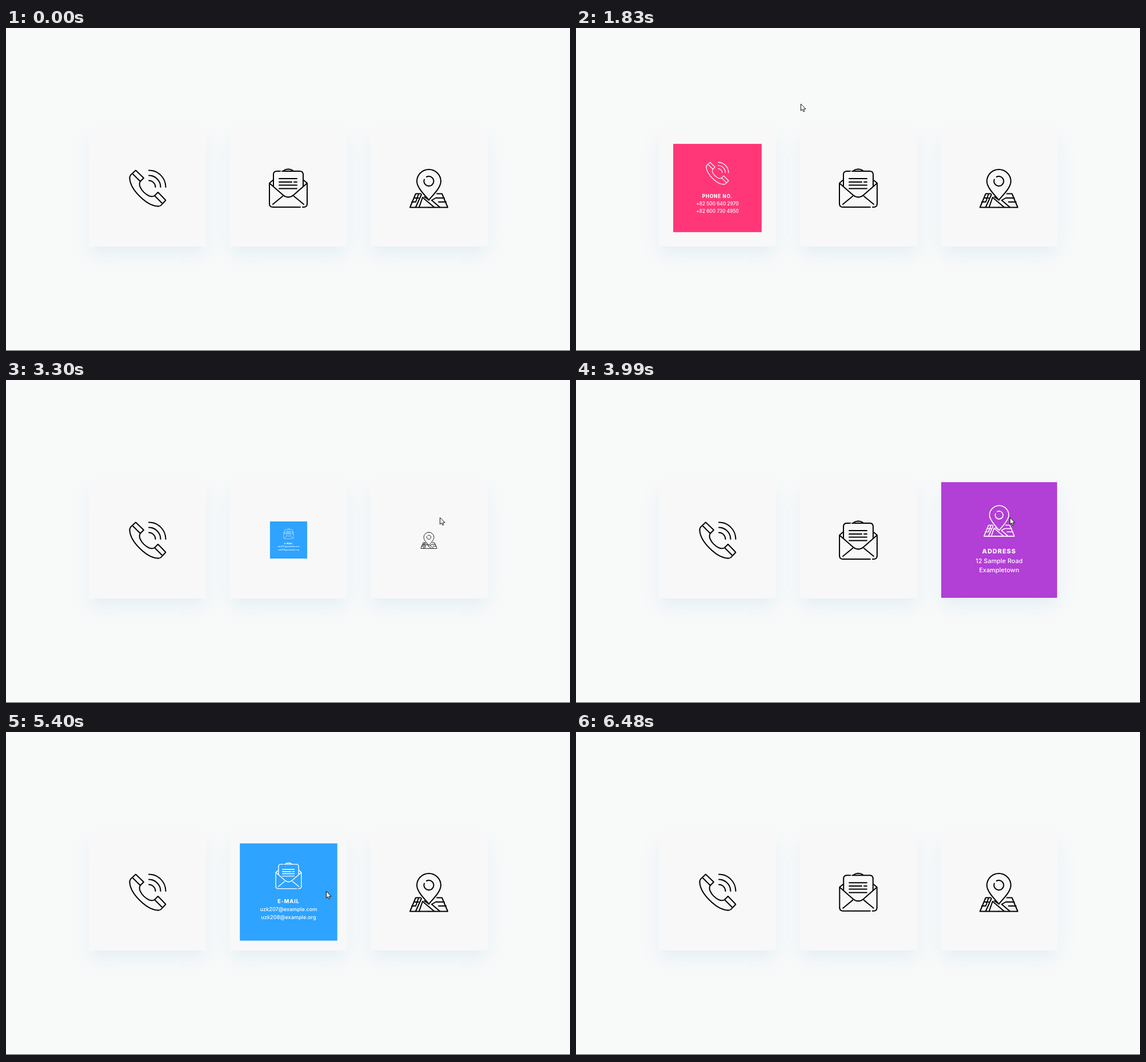
Animation, 987 px wide and 568 px high, one loop 6.87 s. Source, as an HTML page:

```html
<!DOCTYPE html>
<html lang="en">
<head>
<meta charset="utf-8">
<title>Contact cards</title>
<style>
  html, body { margin: 0; width: 100%; height: 100%; overflow: hidden; background: #f8f9f9; }
  body { position: relative; font: 500 11px/17px Inter, sans-serif; }
  .bar { position: absolute; left: 0; right: 0; top: 565px; height: 2px;
         background: #1f1f1f; border-top: 1px solid #777; }
  .card {
    position: absolute; top: 178px; width: 205px; height: 205px; background: #f8f8f8;
    box-shadow: 0 14px 32px rgba(214, 238, 253, .4), 0 20px 18px -10px rgba(130, 150, 170, .08);
  }
  svg { position: absolute; overflow: visible; fill: none; stroke: #000; stroke-width: 2;
        stroke-linecap: round; stroke-linejoin: round; }
  .icon { left: 67.5px; top: 67.5px; width: 70px; height: 70px; }
  .panel { position: absolute; inset: 0; color: #fff; text-align: center; white-space: nowrap; }
  .panel svg { left: 74px; top: 40px; width: 57px; height: 57px; stroke: #fff; }
  .panel div { position: absolute; left: 0; right: 0; top: 113.5px; }
  .panel b { font-weight: 800; letter-spacing: 1px; }
  #cursor { left: 0; top: 0; width: 10px; height: 15px; fill: #fff; stroke: #111; stroke-width: 1; }
</style>
</head>
<body>
<div class="bar"></div>
<svg id="cursor" viewBox="0 0 10 15"><path d="M.5.5V12L3.2 9.6 5 13.7 6.9 12.9 5.2 9H8.8Z"/></svg>
<script>
const LOOP = 6870, STEP = 30, FADE = 450;

const shape = d => `<path d="${d}"/>`;
const mirrored = (d, matrix) => shape(d) + `<g transform="matrix(${matrix})">${shape(d)}</g>`;
const LEFT_RIGHT = '-1 0 0 1 0 0', DIAGONAL = '0 -1 -1 0 0 0';

// A quarter circle of radius r around the phone's earpiece.
const wave = r => `M2 ${-2 - r}A${r} ${r} 0 0 1 ${2 + r}-2`;

const phone = mirrored('M-21-31.5-7-18-13-12-27-26ZM-27-26Q-32-22-31.5-18', DIAGONAL) +
  shape('M-31.5-18C-31 2-2 31 18 31.5M-13-12C-20-2 2 20 12 13' + [11.5, 20.5, 29.5].map(wave).join(''));

const mail =
  mirrored('M-33-9 -9 12Q-5 15.5 0 15.5M-33-9-26-15M-33-9V27M-26-3V-24M-27 28-10 14M-8-31Q-5-33.5 0-33.5', LEFT_RIGHT) +
  shape(`M-33 27Q-33 33-27 33H21M25 33H27Q33 33 33 27M-26-24Q-26-30-20-30H-14M-11-30H20Q26-30 26-24
    M-16-17H15M-16-11H6M10-11H15M-16-5.5H15M-16 .5H15`);

const map =
  mirrored('M0 20.5C-4 15-21 0-21-12.5A21 21 0 0 1 0-33M-14 9.5H-23L-33 33.5H0', LEFT_RIGHT) +
  shape(`M-4-20A8.5 8.5 0 1 1-8-15.5M-26 17H-18M-30 24H-23L-18 10M-23 33-13 11M-17 33-11 16 9 33
    M-8 15 0 20.5M5 21 19 33M5 21 12 17H27M17 24H30`);

// Each card: left edge, colour, drawing, text and [enter, leave] times of the pointer.
const cards = [
  { x: 145, color: '#ff3778', art: phone, hovers: [[720, 1750]],
    text: ['PHONE NO.', '+82 500 640 2970', '+82 600 730 4950'] },
  { x: 391.5, color: '#2ea3ff', art: mail, hovers: [[1903, 3120], [4711, 5638]],
    text: ['E-MAIL', 'uzk207@example.com', 'uzk208@example.org'] },
  { x: 637.5, color: '#b23fd6', art: map, hovers: [[3151, 4440]],
    text: ['ADDRESS', '12 Sample Road', 'Exampletown'] }
];

// Pointer moves: start and end time, then a cubic curve. Between moves it rests.
const moves = [
  { from: 30, to: 270, x: [961, 600, 340, 302], y: [29, 40, 120, 173] },
  { from: 540, to: 1170, x: [302, 300, 275, 258], y: [173, 185, 240, 265] },
  { from: 1590, to: 2080, x: [258, 360, 455, 461], y: [265, 90, 90, 259] },
  { from: 3000, to: 3270, x: [461, 550, 680, 759], y: [259, 250, 240, 241] },
  { from: 4380, to: 4800, x: [759, 650, 560, 560], y: [241, 640, 560, 279] },
  { from: 5580, to: 5790, x: [560, 600, 750, 992], y: [279, 400, 600, 495] }
];

const svg = (art, cls) => `<svg class="${cls}" viewBox="-35 -35 70 70">${art}</svg>`;
const cursor = document.getElementById('cursor');

for (const card of cards) {
  const el = document.createElement('div');
  const [title, ...lines] = card.text;
  el.className = 'card';
  el.style.left = card.x + 'px';
  el.innerHTML = svg(card.art, 'icon') +
    `<div class="panel" style="background:${card.color}">${svg(card.art, '')}
     <div><b>${title}</b><br>${lines.join('<br>')}</div></div>`;
  document.body.insertBefore(el, cursor);
  [card.icon, card.panel] = el.children;
}

const clamp = x => Math.min(1, Math.max(0, x));
const cubic = ([a, b, c, d], s) =>
  (1 - s) ** 3 * a + 3 * (1 - s) ** 2 * s * b + 3 * (1 - s) * s * s * c + s ** 3 * d;

// CSS "ease": cubic-bezier(.25, .1, .25, 1), solved by bisection.
function ease(x) {
  if (x <= 0) return 0;
  if (x >= 1) return 1;
  let lo = 0, hi = 1;
  for (let i = 0; i < 20; i++) {
    const mid = (lo + hi) / 2;
    if (cubic([0, .25, .25, 1], mid) < x) lo = mid; else hi = mid;
  }
  return cubic([0, .1, 1, 1], lo);
}

const scale = (el, k) => {
  el.style.transform = `scale(${k})`;
  el.style.visibility = k > .001 ? 'visible' : 'hidden';
};

// The icon shrinks away before the panel grows, and the reverse on leaving.
function drawCard(card, t) {
  const [enter, leave] = card.hovers.filter(h => h[0] <= t).pop() || [Infinity, Infinity];
  const since = start => ease((t - start) / FADE);
  scale(card.icon, 1 - since(enter) + since(leave + FADE));
  scale(card.panel, since(enter + FADE) - since(leave));
}

function drawCursor(t) {
  const move = moves.filter(m => m.from <= t).pop();
  const visible = move && t < moves[moves.length - 1].to;
  cursor.style.visibility = visible ? 'visible' : 'hidden';
  if (!visible) return;
  const s = clamp((t - move.from) / (move.to - move.from));
  cursor.style.transform =
    `translate(${Math.round(cubic(move.x, s))}px, ${Math.round(cubic(move.y, s))}px)`;
}

const begin = performance.now();
function frame() {
  const t = Math.floor((performance.now() - begin) % LOOP / STEP) * STEP;
  cards.forEach(card => drawCard(card, t));
  drawCursor(t);
  requestAnimationFrame(frame);
}
frame();
</script>
</body>
</html>
```
